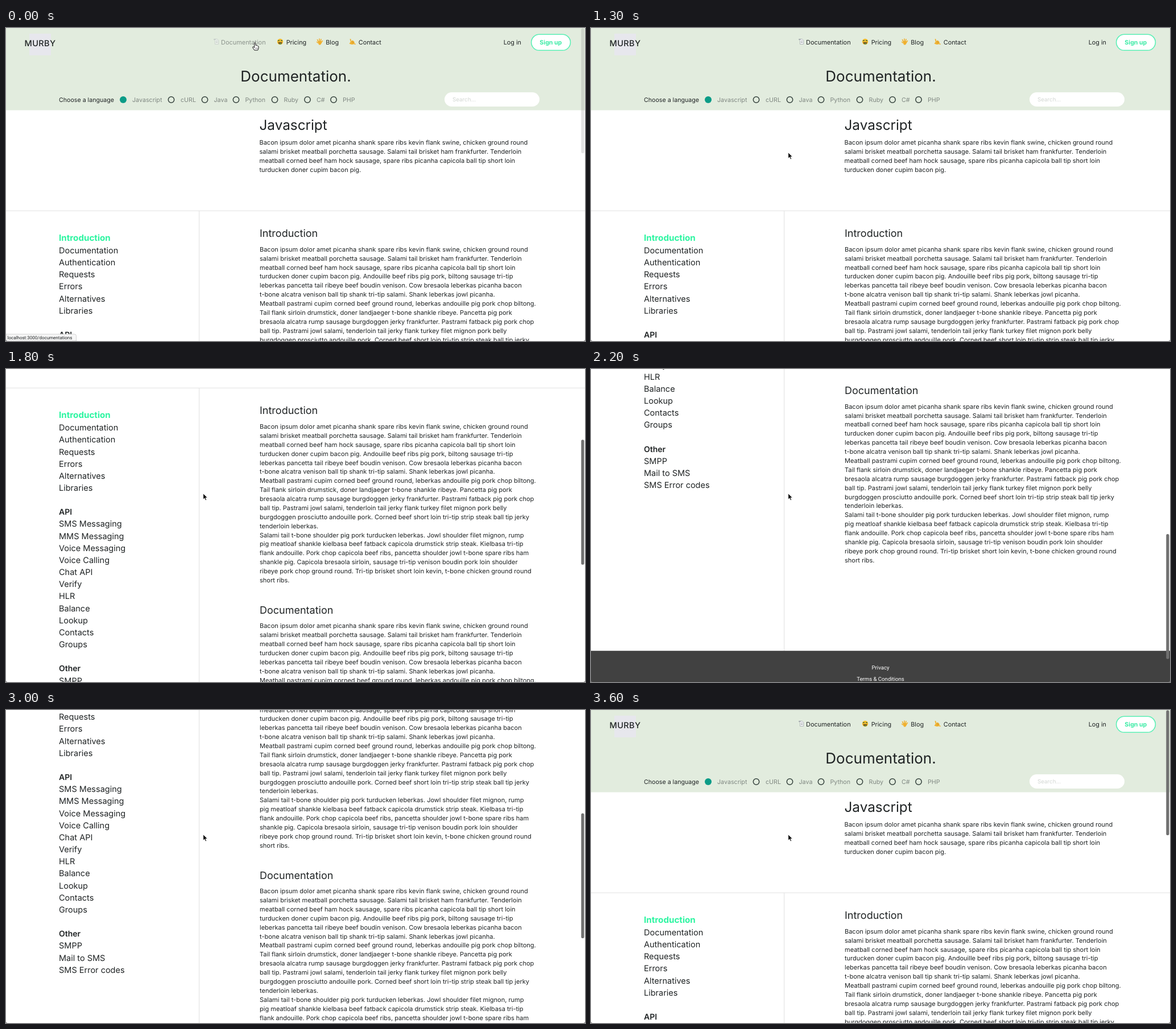
An HTML page for the animation above (3700 ms loop, 1018 by 550 pixels).

```html
<!DOCTYPE html>
<html lang="en">
<head>
<meta charset="utf-8">
<title>Documentation</title>
<style>
  html, body { margin: 0; width: 100%; height: 100%; overflow: hidden; background: #fff; }
  svg { display: block; width: 1018px; height: 550px; }
  text {
    font-family: Inter, sans-serif;
    font-optical-sizing: none;
    text-rendering: geometricPrecision;
    fill: #1f2324;
  }
  .small { font-family: Roboto, sans-serif; }
</style>
</head>
<body>
<svg id="stage" viewBox="0 0 1018 550">
  <g id="page"></g>
  <rect id="bar" x="1011.3" width="5.2" height="219.5" rx="2.6" fill="#707070"/>
  <g id="status">
    <path d="M0 538H120.500Q123.500 538 123.500 541V550H0Z" fill="#f6f6f6" stroke="#c9c9c9" stroke-width=".8"/>
    <text class="small" x="2.5" y="547" font-size="8">localhost:3000/documentations</text>
  </g>
  <path d="M0 547Q0 550 3 550H0ZM1018 547Q1018 550 1015 550H1018Z" fill="#777"/>
  <g id="arrow">
    <path d="M0 0V10.500L2.400 8.300L4 12L5.900 11.200L4.300 7.600H7.600Z" fill="#111" stroke="#fff" stroke-width=".8"/>
  </g>
  <g id="hand">
    <path d="M-1.300 -5.500Q0 -7 1 -5.500V-1.500Q2.200 -2.400 2.900 -1.200Q4.200 -1.600 4.700 -.4Q6 -.4 6 1V3.500L4.700 7H-1.200L-4.300 2.500Q-4.700 .8 -3 1L-1.300 2.500Z"
      fill="#fff" stroke="#151515" stroke-width="1"/>
    <path d="M.7 2.500V5M2.500 2.500V5M4.200 2.500V5" stroke="#444" stroke-width=".6"/>
  </g>
</svg>
<script>
const LOOP = 3700, STEP = 100;
const INK = '#1f2324', MUTED = '#7f8781', GREEN = '#2cf5a1', RULE = '#e4e4e4';
const $ = id => document.getElementById(id);

const text = (x, y, size, str, attrs = '') =>
  `<text x="${x}" y="${y}" font-size="${size}" ${attrs}>${str}</text>`;
const lines = (x, y, rows) =>
  rows.map((row, i) => text(x, y + i * 15.88, 11, row)).join('');
const rect = (x, y, w, h, fill, attrs = '') =>
  `<rect x="${x}" y="${y}" width="${w}" height="${h}" fill="${fill}" ${attrs}/>`;
const centred = 'text-anchor="middle"';

const intro = [
  'Bacon ipsum dolor amet picanha shank spare ribs kevin flank swine, chicken ground round',
  'salami brisket meatball porchetta sausage. Salami tail brisket ham frankfurter. Tenderloin',
  'meatball corned beef ham hock sausage, spare ribs picanha capicola ball tip short loin'
];
const article = [
  ...intro,
  'turducken doner cupim bacon pig. Andouille beef ribs pig pork, biltong sausage tri-tip',
  'leberkas pancetta tail ribeye beef boudin venison. Cow bresaola leberkas picanha bacon',
  't-bone alcatra venison ball tip shank tri-tip salami. Shank leberkas jowl picanha.',
  'Meatball pastrami cupim corned beef ground round, leberkas andouille pig pork chop biltong.',
  'Tail flank sirloin drumstick, doner landjaeger t-bone shankle ribeye. Pancetta pig pork',
  'bresaola alcatra rump sausage burgdoggen jerky frankfurter. Pastrami fatback pig pork chop',
  'ball tip. Pastrami jowl salami, tenderloin tail jerky flank turkey filet mignon pork belly',
  'burgdoggen prosciutto andouille pork. Corned beef short loin tri-tip strip steak ball tip jerky',
  'tenderloin leberkas.',
  'Salami tail t-bone shoulder pig pork turducken leberkas. Jowl shoulder filet mignon, rump',
  'pig meatloaf shankle kielbasa beef fatback capicola drumstick strip steak. Kielbasa tri-tip',
  'flank andouille. Pork chop capicola beef ribs, pancetta shoulder jowl t-bone spare ribs ham',
  'shankle pig. Capicola bresaola sirloin, sausage tri-tip venison boudin pork loin shoulder',
  'ribeye pork chop ground round. Tri-tip brisket short loin kevin, t-bone chicken ground round',
  'short ribs.'
];
const menu = ['Documentation', 'Authentication', 'Requests', 'Errors', 'Alternatives', 'Libraries', '',
  'API', 'SMS Messaging', 'MMS Messaging', 'Voice Messaging', 'Voice Calling', 'Chat API', 'Verify',
  'HLR', 'Balance', 'Lookup', 'Contacts', 'Groups', '', 'Other', 'SMPP', 'Mail to SMS', 'SMS Error codes'];
const languages = [['Javascript', 206, 222], ['cURL', 290.5, 307], ['Java', 349.5, 365.5],
  ['Python', 404.5, 420.5], ['Ruby', 472.5, 488.5], ['C#', 530, 546], ['PHP', 576, 592]];

function icons() {
  const sheet = `<g id="sheet"><path d="M366 19.500H371.500L373.500 22V28.500H367.500V23Z" fill="#f4f5f6" stroke="#a5abb0" stroke-width=".8"/>
    <path d="M365 20H369M369 23H372M369 25.500H372" stroke="#7d858b" stroke-width=".8"/></g>`;
  const face = `<circle cx="482" cy="24" r="5.200" fill="#f3bd2d"/>
    <path d="M478.500 25H485.500Q485 28.500 482 28.500T478.500 25Z" fill="#6b4a20"/>
    <path d="M478 22.200H481M483 22.200H486" stroke="#4f6a35" stroke-width="1.500"/>
    <path d="M481 26.500H483.500V29H481Z" fill="#67a152"/>`;
  const palm = `<path d="M549 24L547.500 20.500M551 23V19M553 23.500L554 19.800M554.500 25L556.500 22.500M549 26.500L546.500 24.500"
    stroke="#f0b02f" stroke-width="1.600" stroke-linecap="round"/>
    <path d="M548.500 23L554 22.800L555.500 25.500L553 29.500H550Z" fill="#f0b02f"/>`;
  const shaka = `<path d="M607 25L605.500 19.800M611 27L613.800 28.300" stroke="#efb232" stroke-width="1.800" stroke-linecap="round"/>
    <path d="M606 24L609.500 21.500L613 25L611 28.800L607.500 29L603.500 27.500Z" fill="#efb232"/>
    <path d="M608.500 25L610.500 23.500M609.500 26.500L611.500 25" stroke="#bd7d21" stroke-width=".7"/>`;
  return sheet + face + palm + shaka;
}

function header() {
  const nav = [['Pricing', 492.7], ['Blog', 562.3], ['Contact', 619.8], ['Log in', 874.7]];
  const radios = languages.map(([name, cx, x], i) => {
    const dot = i
      ? `<circle cx="${cx}" cy="126" r="5.200" fill="none" stroke="#35423d" stroke-width="1.500"/>`
      : `<circle cx="${cx}" cy="126" r="6" fill="#0b9c87"/>`;
    return dot + text(x, 129.9, 10.7, name, `style="fill:${MUTED}"`);
  });
  return rect(0, 0, 1018, 144.5, '#e2ecde')
    + rect(41, 10, 38, 38, '#e7e7ed')
    + text(60, 32.2, 14.5, 'MURBY', `${centred} font-weight="500" letter-spacing=".4"`)
    + icons()
    + text(378, 28.8, 10.95, 'Documentation', 'id="link"')
    + nav.map(([name, x]) => text(x, 28.8, 10.8, name)).join('')
    + rect(923.6, 11.3, 68.8, 28, '#fff', 'rx="14" stroke="#5cf0b6" stroke-width="1.600"')
    + text(957.8, 28.8, 10.6, 'Sign up', `${centred} font-weight="700" style="fill:#3beba5"`)
    + text(509.5, 94.2, 26, 'Documentation.', centred)
    + text(93, 129.9, 10.65, 'Choose a language')
    + radios.join('')
    + rect(771, 113, 167, 25, '#fff', 'rx="12.500"')
    + text(785, 129.3, 9.8, 'Search...', 'style="fill:#d3d7d3"');
}

function sidebar() {
  const rows = menu.map((name, i) => {
    const bold = name === 'API' || name === 'Other';
    return text(93, 396 + i * 21.16, bold ? 14 : 14.5, name, bold ? 'font-weight="600"' : '');
  });
  return text(93, 374.2, 15.2, 'Introduction', `font-weight="700" style="fill:${GREEN}"`) + rows.join('');
}

const section = (name, y) => text(446, y, 18, name) + lines(446, y + 25.6, article);

$('page').innerHTML = header()
  + text(445.5, 178.8, 24.3, 'Javascript')
  + lines(445.5, 205.4, [...intro, 'turducken doner cupim bacon pig.'])
  + rect(0, 320.6, 1018, 1.1, RULE)
  + rect(339, 321, 1.2, 848, RULE)
  + sidebar()
  + section('Introduction', 367.2)
  + section('Documentation', 717.6)
  + rect(0, 1168.7, 1018, 200, '#414141')
  + text(509, 1201.6, 9.6, 'Privacy', `${centred} class="small" style="fill:#fff"`)
  + text(509, 1221.6, 9.6, 'Terms &amp; Conditions', `${centred} class="small" style="fill:#fff"`);

// Scroll keys: time in ms, offset in px, speed in px per 100 ms.
const scrollKeys = [[1300, 0, 0], [1800, 287.8, 110], [2200, 673.5, 2], [2400, 674.3, 0],
  [2700, 674.3, 0], [3000, 421, -125], [3600, 0, 0]];

function scrollAt(t) {
  const i = scrollKeys.findIndex(key => key[0] > t);
  if (i < 1) return 0;
  const [t0, p0, v0] = scrollKeys[i - 1], [t1, p1, v1] = scrollKeys[i];
  const span = (t1 - t0) / 100, u = (t - t0) / (t1 - t0);
  const ease = u * u * (3 - 2 * u);
  return p0 + (p1 - p0) * ease + span * u * (1 - u) * (v0 * (1 - u) - v1 * u);
}

const clamp = v => Math.max(0, Math.min(1, v));
const smooth = u => u * u * (3 - 2 * u);

function draw(t) {
  const scroll = scrollAt(t);
  $('page').setAttribute('transform', `translate(0 ${-scroll})`);

  $('bar').setAttribute('y', 0.5 + scroll * 0.43);
  $('bar').setAttribute('opacity', t > 1300 ? 1 : 0.2 * clamp(1 - t / 200));

  const move = smooth(clamp((t - 100) / 700));
  const x = 437 - 90.3 * move, y = 27 + 191.7 * move;
  const hover = y < 36;
  $('arrow').setAttribute('transform', `translate(${x} ${y})`);
  $('arrow').setAttribute('opacity', hover ? 0 : 1);
  $('hand').setAttribute('transform', `translate(${x + 1} ${y + 5})`);
  $('hand').setAttribute('opacity', hover ? 1 : 0);
  $('link').style.fill = hover ? '#8b938c' : INK;
  $('sheet').setAttribute('opacity', hover ? 0.5 : 1);
  $('status').setAttribute('opacity', clamp((900 - t) / 200));
}

const start = performance.now();
function tick() {
  const t = (performance.now() - start) % LOOP;
  draw(Math.floor(t / STEP) * STEP);
  requestAnimationFrame(tick);
}
tick();
</script>
</body>
</html>
```
